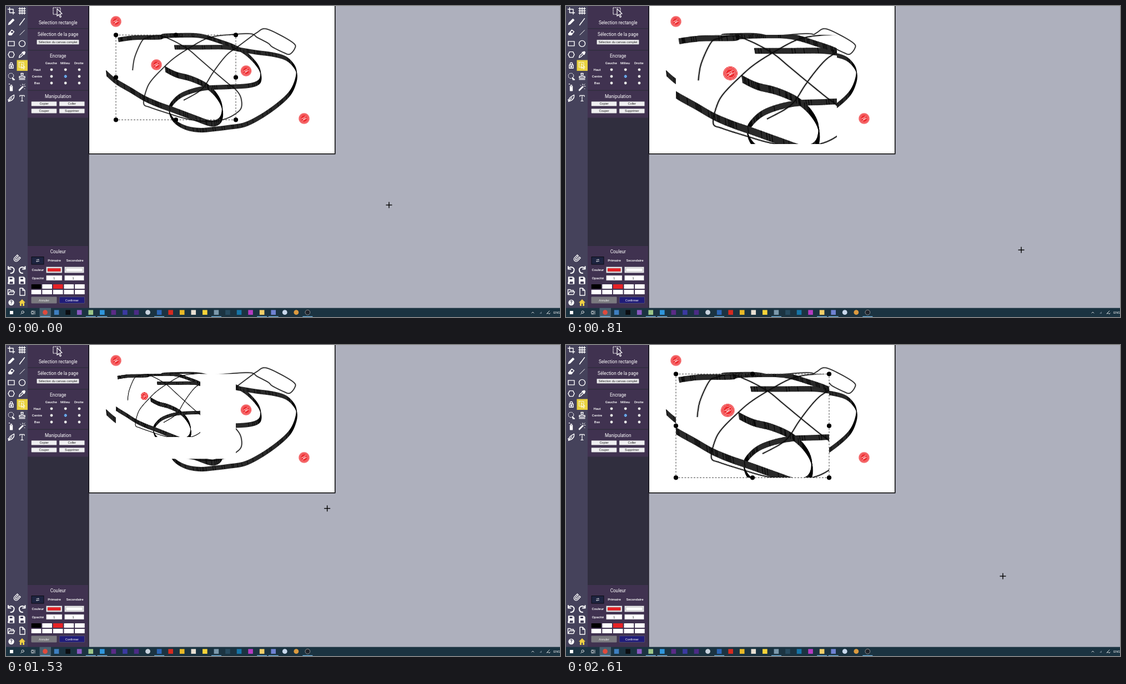
These frames come from a looping animation (998x561 px, 2.64 s). An HTML page with a canvas:

```html
<!DOCTYPE html>
<html lang="fr">
<head>
<meta charset="utf-8">
<title>Selection rectangle</title>
<style>
html, body { margin: 0; width: 100%; height: 100%; overflow: hidden; background: #aeb0bd; }
canvas, svg { position: absolute; left: 0; top: 0; width: 998px; height: 561px; }
text { font-family: Roboto, sans-serif; fill: #fff; text-anchor: middle; }
.title { font-size: 8.2px; }
.label { font-size: 6.2px; font-weight: 500; }
.btn { font: 5.5px "Liberation Sans", Arial, sans-serif; fill: #111; }
.icon { fill: none; stroke: #fff; stroke-width: 1.4; stroke-linejoin: round; stroke-linecap: round; }
.icon .f { fill: #fff; }
</style>
</head>
<body>
<canvas id="stage" width="998" height="561"></canvas>
<svg id="ui" viewBox="0 0 998 561"></svg>
<script>
const LOOP = 2640;
const PAGE = { w: 593, h: 267 };
const BOX = { x: 198, y: 52.3, w: 216, h: 153 };
const ZOOM = 2;

/* ---------- interface ---------- */
const out = [];
const rect = (x, y, w, h, fill, more = '') =>
  out.push(`<rect x="${x}" y="${y}" width="${w}" height="${h}" fill="${fill}" ${more}/>`);
const dot = (x, y, r, fill, more = '') =>
  out.push(`<circle cx="${x}" cy="${y}" r="${r}" fill="${fill}" ${more}/>`);
const text = (s, x, y, cls, more = '') =>
  out.push(`<text x="${x}" y="${y}" class="${cls}" ${more}>${s}</text>`);
const icon = (x, y, body) =>
  out.push(`<g class="icon" transform="translate(${x} ${y})">${body}</g>`);
const button = (s, x, y, w, h, fill = '#efeff1', ink = '#111') => {
  rect(x, y, w, h, fill, 'rx=".8" stroke="#77737f" stroke-width=".5"');
  text(s, x + w / 2, y + h / 2 + 2, 'btn', `style="fill:${ink}"`);
};
const path = (d, cls = '') => `<path d="${d}" class="${cls}"/>`;

function sidebar() {
  rect(0, 0, 39, 545, '#45425b');
  rect(39, 0, 110, 545, '#302e3e');
  for (const [y, h] of [[0, 40], [41.5, 37.5], [80.5, 71], [153, 48.5], [433, 112]])
    rect(39, y, 109, h, '#403250');
  rect(148.4, 0, 1.2, 545, '#1d1b26');
  rect(19.5, 97.5, 19.5, 19.5, '#e9d23f');

  icon(93, 11, '<path d="M-8-8H5V4H-8Z" stroke-width="1.1" stroke-dasharray="2 1.6"/>' +
    '<path d="M-1-6 8 3 4 3.5 6.5 8.5 4.5 9.5 2 4.5-1 7Z" fill="#403250" stroke-width="1.2"/>');
  text('Selection rectangle', 93.7, 32.5, 'title');
  text('Sélection de la page', 93.7, 54.3, 'title');
  button('Sélection du canvas complet', 55.5, 61, 76, 8.2);

  text('Encrage', 93.7, 92.7, 'title');
  const cols = [82, 107.2, 132], rows = [114.8, 127, 139];
  ['Gauche', 'Milieu', 'Droite'].forEach((s, i) => text(s, cols[i] - .7, 105.2, 'label'));
  ['Haut', 'Centre', 'Bas'].forEach((s, j) => {
    text(s, 56, rows[j] + 2.2, 'label');
    cols.forEach(x => dot(x, rows[j], 2.4, '#fff', 'stroke="#777" stroke-width=".4"'));
  });
  dot(cols[1], rows[1], 2.2, '#fff', 'stroke="#1673d8" stroke-width="1"');
  dot(cols[1], rows[1], 1.1, '#1673d8');

  text('Manipulation', 93.7, 165.7, 'title');
  button('Copier', 45.7, 172.3, 45.6, 8.2);
  button('Coller', 96, 172.3, 45.6, 8.2);
  button('Couper', 45.7, 185.2, 45.6, 8.2);
  button('Supprimer', 96, 185.2, 45.6, 8.2);

  text('Couleur', 93.7, 445.6, 'title');
  rect(46, 452.5, 22, 13.5, '#1e2440', 'stroke="#0b0c14"');
  icon(57, 459.2, '<path d="M-2-1.3H2.5L1-2.3M2.5 1.3H-2.5L-1 2.3" stroke-width=".8"/>');
  text('Primaire', 87, 461.4, 'label');
  text('Secondaire', 124, 461.4, 'label');
  text('Couleur', 57.3, 478, 'label');
  text('Opacité', 57.3, 492.8, 'label');
  [72.5, 105.5].forEach((x, i) => {
    const w = i ? 35 : 28.5;
    rect(x, 470.6, w, 10.6, '#f1f1f3', 'stroke="#77737f" stroke-width=".5"');
    rect(x + 2.4, 473, w - 4.8, 6, i ? '#fff' : '#e72226', 'stroke="#777" stroke-width=".5"');
    rect(x, 486, w, 9, '#fff', 'stroke="#77737f" stroke-width=".5"');
    text('1', x + w / 2 - (i ? 2 : 0), 492.6, 'btn');
  });
  for (let i = 0; i < 10; i++)
    rect(45.7 + i % 5 * 19.6, i < 5 ? 502 : 512, 17.6, 8,
      i === 0 ? '#000' : i === 2 ? '#e72226' : '#fff', 'rx=".6"');
  button('Annuler', 45.7, 524.8, 45.6, 11.4, '#7b7a7f', '#eee');
  button('Confirmer', 96, 524.8, 45.6, 11.4, '#201c79', '#fff');
}

function tools() {
  const doc = path('M-4-6H1L5-2V7H-4ZM1-6V-2H5');
  const disk = path('M-5-6H3L5-4V6H-5Z', 'f') +
    '<path d="M-3-5H2V-2H-3ZM-3 2H3V6H-3Z" fill="#45425b" stroke="none"/>';
  const curl = path('M-4.5-3.5C0-7 6-4 5 1 4.5 4 2 6-1 6') + path('M-5.5-6V-1.5H-1');
  const set = [
    path('M-6-3H3.5V6M-3-6V3.5H6'),
    path('M-6-4H6M-6 0H6M-6 4H6M-4-6V6M0-6V6M4-6V6'),
    path('M-5 5-4 2 3-5 5-3-2 4Z', 'f'),
    path('M-4.5 6 4.5-6M-4.5 6-2 2'),
    path('M-5 2 1-5 5-2 0 4H-4Z') + path('M-2-1 2 2 0 4H-4L-5 2Z', 'f'),
    '<path d="M-4 4 4.5-4.5" stroke-width="1"/>',
    path('M-5.5-4H5.5V4H-5.5Z'),
    '<circle r="5.5"/>',
    path('M-3-5H3L5.5 0 3 5H-3L-5.5 0Z'),
    path('M-5.5 5.5-4.5 2 1-3 3-1-2 4Z') + path('M0-4 4 0 5.5-4 4-5.5Z', 'f'),
    path('M-3.5-1H3.5V5H-3.5ZM-2-1V-4Q0-6 2-4V-1') + '<circle cy="2" r="1" class="f"/>',
    '<path d="M-5.5-5.5H3V3H-5.5Z" stroke-width="1" stroke-dasharray="1.5 1.5"/>' +
      '<path d="M-1-3 5 3H2.5L4 6 2 6 1 4-1 5Z" stroke-width=".9"/>',
    '<circle cx="-.5" cy="-1" r="4.8" stroke-dasharray="2 1.8" stroke-width="1"/>' + path('M2 2 6 6H3Z'),
    path('M-2-5.5H2L1 0H5V3H-5V0H-1ZM-5 5.5H5') ,
    path('M-2-2H2V6H-2ZM-1-4H1M-4-6H-3') + path('M-1 0H1V5H-1Z', 'f'),
    path('M-5 6 2-1', 'f') + '<path d="M-5 5 1-1" stroke-width="2.6"/>' +
      '<path d="M1-6V-4M4-2H6M3-4 5-6M-3-4-2-3M4 2 5 3" stroke-width="1"/>',
    path('M-5 6C-5-1 0-3 5-6 6 0 2 4-5 6L1-1') + path('M-6 3H-2'),
    '<path d="M-4-3V-5H4V-3M0-5V5M-2 5H2" stroke-width="1.2"/>'
  ];
  set.forEach((s, i) => icon(i % 2 ? 29 : 9.5, 8.8 + (i >> 1) * 19.7, s));

  icon(19, 456, '<g transform="rotate(45)">' + path('M-4-6V1A4 4 0 0 0 4 1V-6H1.5V1A1.5 1.5 0 0 1-1.5 1V-6Z') + '</g>');
  icon(9.5, 476, '<g stroke-width="2">' + curl + '</g>');
  icon(29, 476, '<g transform="scale(-1 1)" stroke-width="2">' + curl + '</g>');
  icon(9.5, 495, disk + '<path d="M-6 5 1-1M1-1H-2M1-1V2" stroke="#fff" stroke-width="1.4"/>');
  icon(29, 495, disk);
  icon(9.5, 515.5, path('M-6 5V-4H-2L-1-2.5H4V0M-6 5-3 0H6L4 5Z'));
  icon(29, 515, doc);
  dot(9.5, 535, 5.2, '#fff');
  text('?', 9.5, 538.2, 'title', 'style="fill:#45425b;font-weight:700;font-size:9px"');
  icon(29, 535, '<path d="M-6 0 0-6 6 0H4V6H1V2H-1V6H-4V0Z" fill="#f0cf45" stroke="none"/>');
}

function taskbar() {
  rect(0, 544.7, 998, 16.3, '#1b3341');
  rect(60.5, 544.7, 20.5, 16.3, '#496070');
  rect(7, 550, 6, 6, '#fff');
  icon(29.5, 553, '<g stroke-width=".8"><circle cx=".6" cy="-.8" r="2.2"/>' + path('M-1 1-3 3') + '</g>');
  icon(49, 553, '<g stroke-width=".7">' + path('M-3-1.5H1V1.5H-3ZM-3-3H1M-3 3H1M3-3V3') + '</g>');
  const apps = ['o#de4b3e', '#3f7fc0', '#0c0d10', '#8a58c0', '#9cc789', '#2f96dc', '#5b2b86',
    '#3b3aa0', '#4c2b85', 'o#c9d3df', '#2b64b5', '#d42a20', '#e9b928', '#e8dfd2', '#f8d339',
    '#7c99ac', '#274a5f', '#1675a8', '#b43cc0', '#f0ce69', '#6f82d2', 'o#c9d8ec', 'o#dc9a3f', 'o#20232a'];
  apps.forEach((c, i) => {
    const x = 70.5 + i * 20.56;
    if (c[0] === 'o') dot(x, 552.7, 4.4, c.slice(1), i === 23 ? 'stroke="#bbb" stroke-width=".7"' : '');
    else rect(x - 4.3, 548.4, 8.6, 8.6, c);
    if ([0, 4, 5, 10, 15, 19, 20, 23].includes(i)) rect(x - 9, 559.7, 18, 1.3, '#78b8e4');
  });
  icon(949, 553, '<path d="M-2 1 0-1 2 1" stroke-width=".8"/>');
  icon(963, 553, '<path d="M-2 2 2-2V2Z" fill="#5f7280" stroke="none"/>');
  icon(977, 553, '<path d="M-3 2 2-3M-2 2Q0 0 1 2T3 1" stroke-width=".8"/>');
  text('ENG', 992.3, 554.9, 'btn', 'style="fill:#fff"');
}

sidebar();
tools();
taskbar();
document.getElementById('ui').innerHTML = out.join('');

/* ---------- drawing on the page ---------- */
const parse = s => s.split(' ').map(p => p.split(',').map(Number));

// Catmull-Rom samples through the given points.
function curve(points, steps) {
  const p = parse(points), res = [];
  for (let i = 0; i < p.length - 1; i++) {
    const a = p[i - 1] || p[i], b = p[i], c = p[i + 1], d = p[i + 2] || c;
    for (let k = 0; k < steps; k++) {
      const u = k / steps;
      res.push([0, 1].map(n => b[n] + .5 * u * (c[n] - a[n] +
        u * (2 * a[n] - 5 * b[n] + 4 * c[n] - d[n] + u * (3 * (b[n] - c[n]) + d[n] - a[n])))));
    }
  }
  res.push(p[p.length - 1]);
  return res;
}

let seed = 7;
const rnd = () => (seed = seed * 16807 % 2147483647) / 2147483647;

function trace(g, pts) {
  g.beginPath();
  pts.forEach(p => g.lineTo(p[0], p[1]));
  g.stroke();
}

// Ribbon left by an upright nib, with darker streaks.
function ribbon(g, points, nib) {
  const pts = curve(points, 12), dx = .6;
  g.lineWidth = 1;
  g.fillStyle = g.strokeStyle = '#262626';
  for (let i = 1; i < pts.length; i++) {
    const [x, y] = pts[i - 1], [u, v] = pts[i];
    const steep = Math.abs(v - y) > 1.2 * Math.abs(u - x);
    g.fillStyle = g.strokeStyle = steep ? '#080808' : '#2a2a2a';
    g.beginPath();
    g.moveTo(x - dx, y - nib);
    g.lineTo(x + dx, y + nib);
    g.lineTo(u + dx, v + nib);
    g.lineTo(u - dx, v - nib);
    g.closePath();
    g.fill();
    g.stroke();
  }
  g.strokeStyle = '#000';
  g.lineWidth = .8;
  for (const [x, y] of pts)
    if (rnd() < .38) trace(g, [[x - dx, y - nib], [x + dx, y + nib]]);
}

function pencil(g, points) {
  const pts = curve(points, 8);
  for (const [w, c] of [[3.6, 'rgba(0,0,0,.13)'], [1.35, '#0a0a0a']]) {
    g.lineWidth = w;
    g.strokeStyle = c;
    trace(g, pts);
  }
}

function stamp(g, x, y) {
  const ring = (r, w, c) => {
    g.beginPath();
    g.arc(x, y, r, 0, 7);
    g.lineWidth = w;
    g.strokeStyle = c;
    g.stroke();
  };
  g.beginPath();
  g.arc(x, y, 9.6, 0, 7);
  g.fillStyle = '#ee2b2f';
  g.fill();
  ring(8.3, .7, '#ffc9c9');
  ring(6.3, .7, '#ffb0b0');
  g.strokeStyle = '#ffd9d9';
  g.lineWidth = .8;
  trace(g, [[x - 5, y + 1], [x + 3.4, y - 4.3]]);
  trace(g, [[x - 3.4, y + 4.3], [x + 5, y - 1]]);
  g.lineWidth = 1;
  trace(g, [[x - 2.2, y + .3], [x - .6, y + 1.6], [x + 2.4, y - 1.6]]);
}

const art = document.createElement('canvas');
art.width = PAGE.w * ZOOM;
art.height = PAGE.h * ZOOM;
{
  const g = art.getContext('2d');
  g.scale(ZOOM, ZOOM);
  g.lineJoin = 'round';
  g.fillStyle = '#fff';
  g.fillRect(0, 0, PAGE.w, PAGE.h);
  ribbon(g, '304,74.5 350,74.5 395,74.5 420,78.5 450,83.5 480,87.5 503,94 517,106 523.5,120 521,138 ' +
    '511,158 490,178 460,199 430,214 400,219 375,222 350,224 325,220 305,209 295,194 296,181 310,165 ' +
    '330,155 360,148 400,146 435,144 453,139 459,130 457,115 447,100 430,84 410,73 385,64 360,56 ' +
    '340,53 310,53 285,54 275,56.5 235,57 215,59 202.5,61', 3.6);
  ribbon(g, '181,121.5 198,136 225,152 250,167 275,178 300,187 340,202 365,211 378,211 387,204 390,190 ' +
    '387,175 378,160 365,147 350,138 330,130 310,125 298,120 287,114', 5);
  pencil(g, '228,116 232,92 245,63 256,57 275,53 300,62 328,78 348,95 371,115 398,138 414,151 ' +
    '423,165 424,183 414,194 397,203 375,208 345,207 319,202 293,194 260,183 248,176 253,151 263,133 ' +
    '287,108 304,93 328,77 356,61 375,55 400,52 440,50 453,57 472,67 480,74 500,84 511,87 520,77 ' +
    '519,68 495,53 467,41 452,48 438,58 414,76 400,86 386,102 371,123 358,144 345,156 320,170');
  parse('198,28 271,106 432.5,117 537,203').forEach(p => stamp(g, ...p));
}

/* ---------- motion ---------- */
// time, pointer x, y, selection width, height
const keys = [
  [0, 690, 359, 216, 153], [30, 688, 358, 216, 153], [130, 650, 334, 194, 140],
  [260, 612, 312, 170, 126], [400, 640, 330, 182, 133], [500, 689, 359, 211, 150],
  [600, 740, 390, 243, 170], [720, 790, 421, 271, 186], [810, 820, 440, 290, 197],
  [900, 827, 444, 299, 203], [960, 827, 444, 300, 203], [1080, 819, 435, 297, 199],
  [1260, 726, 376, 240, 163.5], [1530, 579, 295, 152, 114], [1640, 550, 280, 131, 106],
  [1760, 585, 300, 148, 117], [1950, 701, 371, 214, 152.5], [2160, 784, 416, 272, 186],
  [2220, 787, 417, 276, 187], [LOOP, 787, 417, 276, 187]
];

// Cubic through the keys, flat at turning points.
function slope(i, n) {
  if (i < 1 || i > keys.length - 2) return 0;
  const rate = j => (keys[j + 1][n] - keys[j][n]) / (keys[j + 1][0] - keys[j][0]);
  const a = rate(i - 1), b = rate(i);
  return a * b <= 0 ? 0 : 2 * a * b / (a + b);
}

function pose(t) {
  let i = 0;
  while (i < keys.length - 2 && keys[i + 1][0] <= t) i++;
  const a = keys[i], b = keys[i + 1], d = b[0] - a[0], u = (t - a[0]) / d, v = 1 - u;
  return [1, 2, 3, 4].map(n => a[n] * v * v * (1 + 2 * u) + b[n] * u * u * (3 - 2 * u) +
    d * u * v * (slope(i, n) * v - slope(i + 1, n) * u));
}

const ctx = document.getElementById('stage').getContext('2d');

function handles(w, h) {
  const { x, y } = BOX;
  ctx.strokeStyle = '#444';
  ctx.lineWidth = 1;
  ctx.setLineDash([3, 2.5]);
  ctx.strokeRect(x, y, w, h);
  ctx.setLineDash([]);
  ctx.fillStyle = '#000';
  for (let i = 0; i < 9; i++) {
    if (i === 4) continue;
    ctx.beginPath();
    ctx.arc(x + i % 3 * w / 2, y + Math.floor(i / 3) * h / 2, 4.1, 0, 7);
    ctx.fill();
  }
}

function draw(t) {
  const [px, py, w, h] = pose(t);
  const { x, y } = BOX;
  ctx.fillStyle = '#aeb0bd';
  ctx.fillRect(0, 0, 998, 561);
  ctx.fillStyle = '#000';
  ctx.fillRect(149, 0, PAGE.w - 148.5, PAGE.h + .5);
  ctx.drawImage(art, 150 * ZOOM, 0, (PAGE.w - 151) * ZOOM, (PAGE.h - 1) * ZOOM, 150, 0, PAGE.w - 151, PAGE.h - 1);
  if (t >= 30) {
    ctx.fillStyle = '#fff';
    ctx.fillRect(x, y, BOX.w, BOX.h);
    ctx.drawImage(art, x * ZOOM, y * ZOOM, BOX.w * ZOOM, BOX.h * ZOOM, x, y, w, h);
  }
  if (t < 30 || t >= 2400) handles(w, h);
  ctx.strokeStyle = '#000';
  ctx.lineWidth = 1.4;
  trace(ctx, [[px - 5.5, py], [px + 5.5, py]]);
  trace(ctx, [[px, py - 5.5], [px, py + 5.5]]);
}

const start = performance.now();
function tick() {
  draw((performance.now() - start) % LOOP);
  requestAnimationFrame(tick);
}
tick();
</script>
</body>
</html>
```
